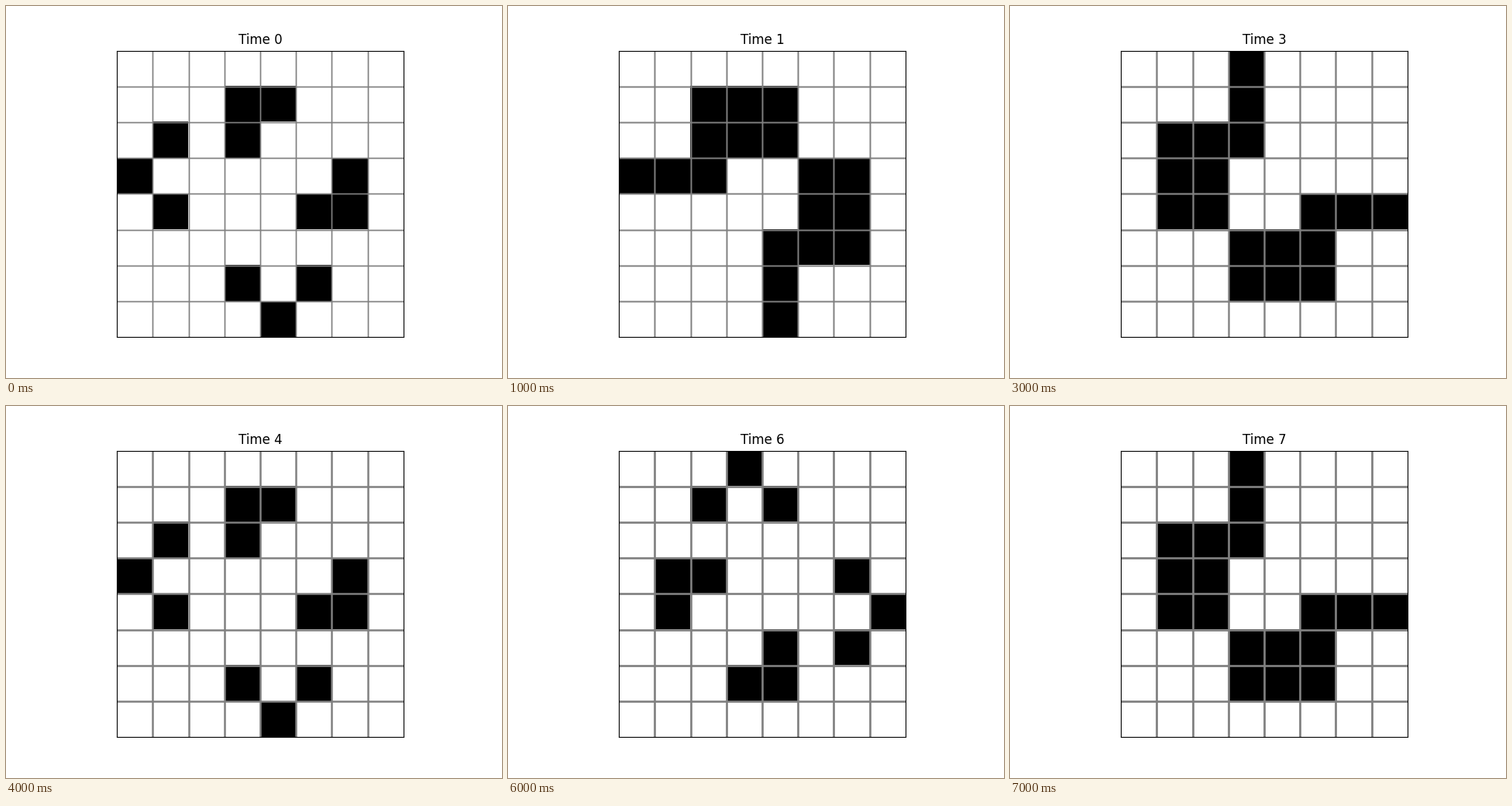
These frames come from a looping animation (640x480 px, 8000 ms). A matplotlib script:

```python
import numpy as np
import matplotlib.pyplot as plt
from matplotlib.animation import FuncAnimation

SIZE = 8
STEPS = 8
START = [
    "........",
    "...##...",
    ".#.#....",
    "#.....#.",
    ".#...##.",
    "........",
    "...#.#..",
    "....#...",
]


def step(grid):
    """One Game of Life generation; everything beyond the border is dead."""
    p = np.pad(grid, 1)
    around = sum(p[r:r + SIZE, c:c + SIZE] for r in range(3) for c in range(3)) - grid
    return ((around == 3) | ((grid == 1) & (around == 2))).astype(int)


states = [np.array([[int(ch == "#") for ch in row] for row in START])]
while len(states) < STEPS:
    states.append(step(states[-1]))

fig, ax = plt.subplots(figsize=(6.4, 4.8), dpi=100)
image = ax.imshow(states[0], cmap="binary", vmin=0, vmax=1, interpolation="nearest")
ax.set_xticks([])
ax.set_yticks([])
title = ax.set_title("Time 0")


def grid_layer():
    style = dict(color="gray", linewidth=1)
    edges = np.arange(SIZE - 1) + 0.5
    return [draw(e, **style) for e in edges for draw in (ax.axhline, ax.axvline)]


# Stacked layers make the soft edges of the grid lines darken over time.
layers = [grid_layer() for _ in range(STEPS + 1)]


def update(t):
    image.set_data(states[t])
    title.set_text(f"Time {t}")
    for i, layer in enumerate(layers):
        for line in layer:
            line.set_visible(i < t + 2)


anim = FuncAnimation(fig, update, frames=STEPS, interval=1000,
                     repeat=True, repeat_delay=0, blit=False)
plt.show()
```
